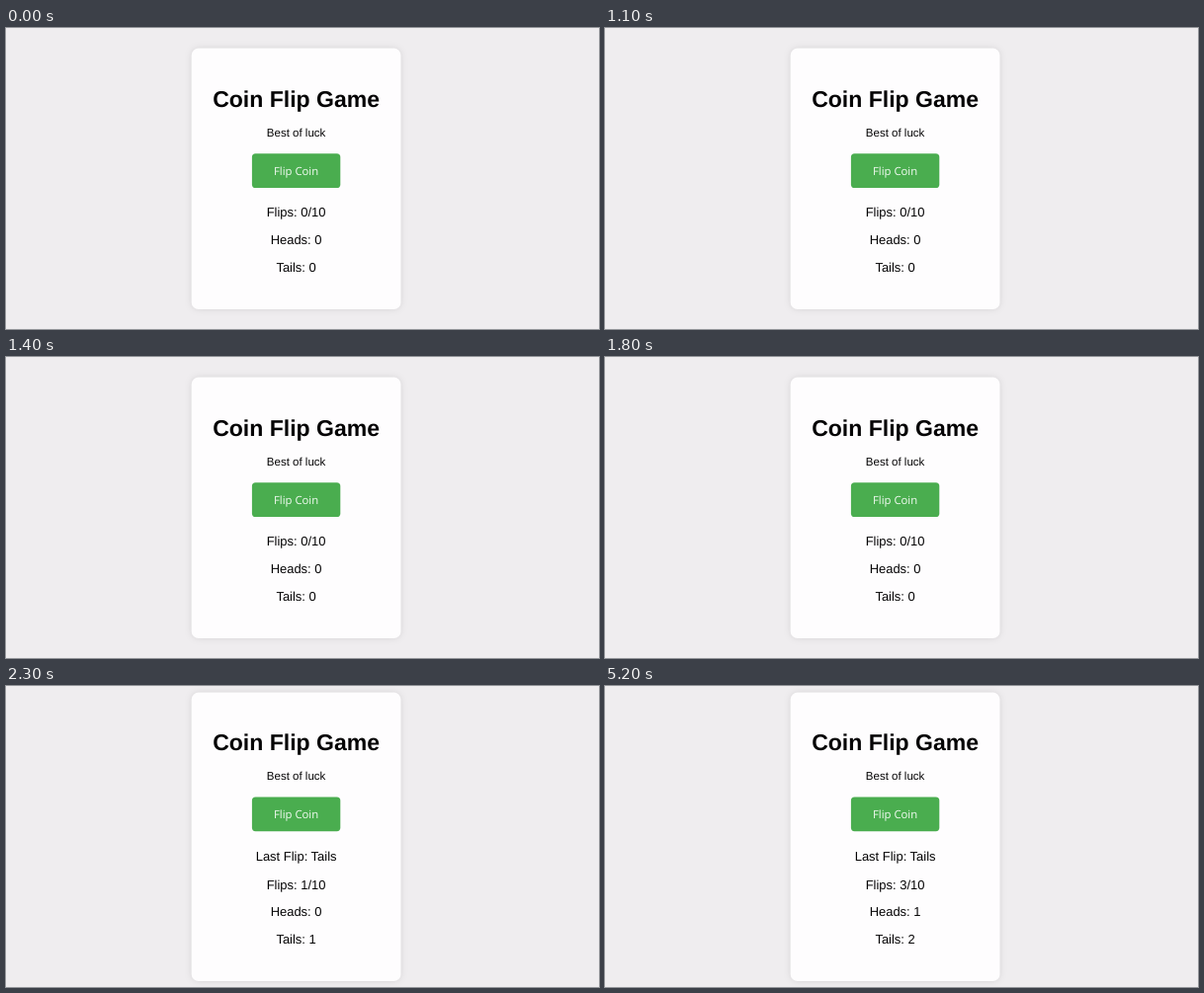
Recreate the animation shown at these times as an HTML page. Size 600 px wide and 305 px high, loop 8000 ms.

```html
<!DOCTYPE html>
<html lang="en">
<head>
<meta charset="utf-8">
<title>Coin Flip Game</title>
<style>
  html, body { margin: 0; width: 100%; height: 100%; overflow: hidden; background: #efedef; }
  svg { display: block; width: 600px; height: 305px; }
  text {
    font-family: "Liberation Sans", Arial, sans-serif;
    font-size: 12.96px;
    text-anchor: middle;
    text-rendering: geometricPrecision;
    fill: #050405;
  }
  #card { fill: #fefdfe; filter: drop-shadow(0 0 3.6px rgba(0, 0, 0, .1)); }
  #title { font-size: 23.04px; font-weight: bold; }
  #luck { font-size: 11.52px; }
  #button { fill: #4aad4f; }
  #label { font-family: "Open Sans", "Noto Sans", sans-serif; font-size: 11.3px; fill: #f3fbf3; }
</style>
</head>
<body>
<svg viewBox="0 0 600 305">
  <rect id="card" x="187.7" width="211.8" rx="7.2"/>
  <g id="top">
    <text id="title" x="293.6" y="80">Coin Flip Game</text>
    <text id="luck" x="293.6" y="110.2">Best of luck</text>
    <rect id="button" x="248.9" y="127.2" width="89.4" height="34.8" rx="3.6"/>
    <text id="label" x="293.6" y="148.6">Flip Coin</text>
  </g>
  <text id="last" x="293.6" y="176.6"></text>
  <g id="stats">
    <text id="flips" x="293.6" y="191.4"></text>
    <text id="heads" x="293.6" y="219.1"></text>
    <text id="tails" x="293.6" y="246.8"></text>
  </g>
</svg>
<script>
const LOOP = 8000;
const flips = [
  { at: 2300, side: "Tails" },
  { at: 3700, side: "Heads" },
  { at: 5200, side: "Tails" },
];
const el = id => document.getElementById(id);
const count = (done, side) => done.filter(flip => flip.side === side).length;
let shown = -1;

function render(time) {
  const done = flips.filter(flip => flip.at <= time);
  const n = done.length;
  if (n === shown) return;
  shown = n;

  // The result line makes the centred card taller.
  el("card").setAttribute("y", n ? 6.6 : 20.6);
  el("card").setAttribute("height", n ? 292.5 : 264.5);
  el("top").setAttribute("transform", `translate(0 ${n ? -14.8 : 0})`);
  el("stats").setAttribute("transform", `translate(0 ${n ? 14.2 : 0})`);

  el("last").textContent = n ? `Last Flip: ${done[n - 1].side}` : "";
  el("flips").textContent = `Flips: ${n}/10`;
  el("heads").textContent = `Heads: ${count(done, "Heads")}`;
  el("tails").textContent = `Tails: ${count(done, "Tails")}`;
}

function tick() {
  render(performance.now() % LOOP);
  requestAnimationFrame(tick);
}
tick();
</script>
</body>
</html>
```
